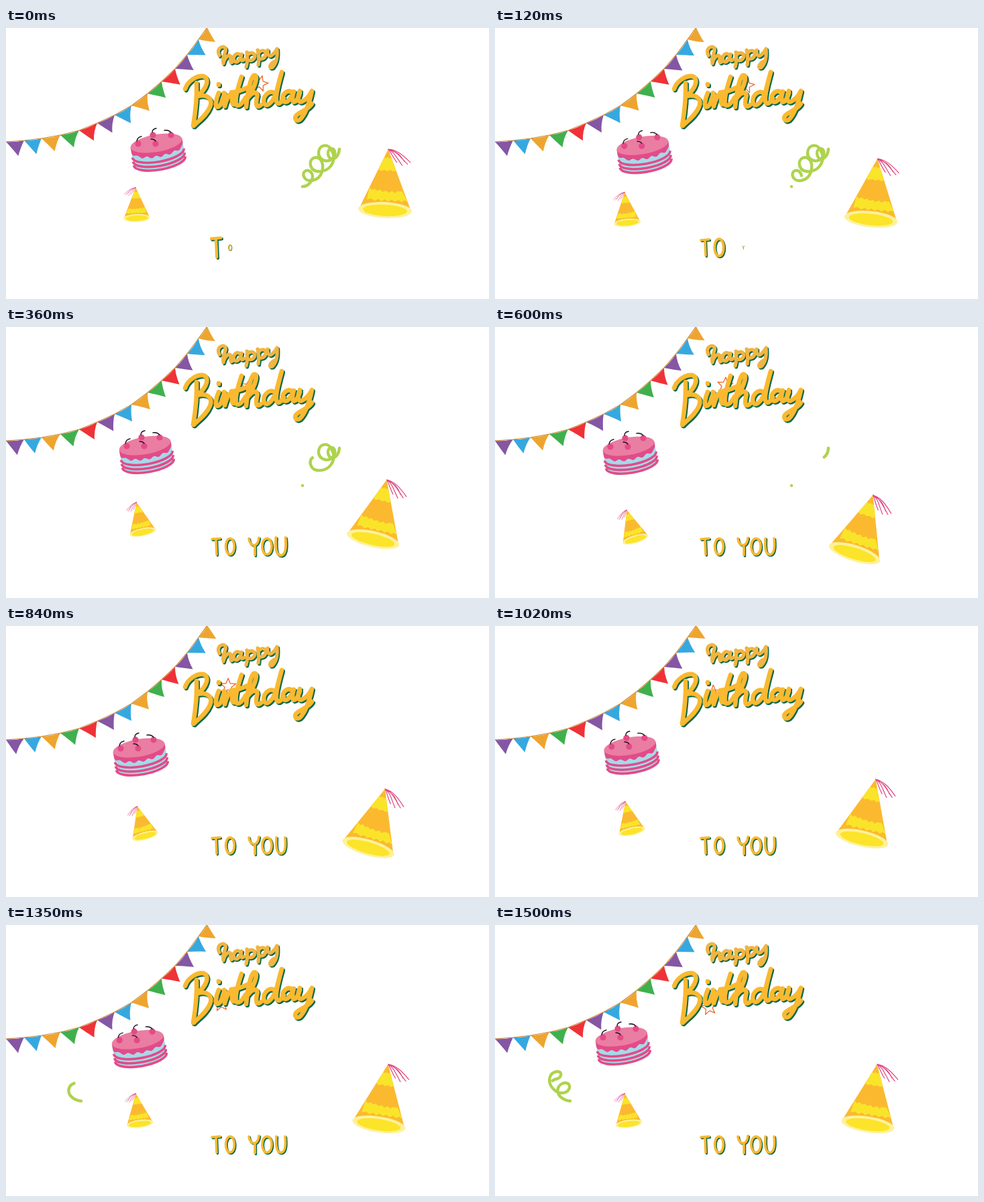
These frames come from a looping animation (720x405 px, 1.53 s). An HTML page:

```html
<!DOCTYPE html>
<html lang="en">
<head>
<meta charset="utf-8">
<title>Happy Birthday</title>
<style>
html, body { margin: 0; width: 100%; height: 100%; overflow: hidden; background: #fff; }
svg { display: block; width: 100vw; height: 100vh; }
.line { fill: none; stroke-linecap: round; stroke-linejoin: round; }
.shade { stroke: #08694c; }
.gold { stroke: #fab930; }
.happy.gold { stroke: #f1b541; }
.happy { stroke-width: 5.2; }
.birth { stroke-width: 6.6; }
.pop { stroke-width: 3.6; }
.curl { stroke: #aed34d; stroke-width: 4.4; }
.tassel { stroke: #df4580; stroke-width: 1.2; }
.stem { stroke: #161616; stroke-width: 1.4; }
.stripe { fill: none; stroke: #e34b87; stroke-width: 3.6; }
</style>
</head>
<body>
<svg viewBox="0 0 720 405" role="img" aria-label="happy Birthday to you">
  <defs>
    <path id="happy" d="M318 41C313 31 322 26 326 29C331 33 321 43 324 53C326 43 334 37 335 44C334 51 335 54 339 49
      M349 40C343 34 336 45 341 50C345 53 350 46 351 39C349 47 351 51 355 47
      M359 36C360 44 360 52 358 58M359 42C364 33 374 38 370 45C367 50 362 49 360 47
      M375 33C377 41 377 49 376 55M376 39C380 30 390 34 387 41C384 47 379 47 377 45
      M390 33C389 40 393 44 397 40C401 37 403 33 404 31C405 42 403 53 397 59C391 61 393 54 400 50"/>
    <path id="birth" d="M267 91C271 79 284 71 294 72C304 75 300 90 285 102C300 98 309 106 304 118C299 130 289 137 280 146
      M284 82C285 105 282 128 279 146
      M317 97C313 106 311 118 315 118C320 118 323 108 326 99M317 84L317 85
      M325 97C329 103 328 110 326 117C329 106 333 98 338 97C338 106 334 116 342 114
      M351 73C346 88 341 106 343 114C346 119 352 113 357 104M336 96C344 96 352 93 360 89
      M358 118C360 98 364 76 369 71C376 68 374 84 360 105C368 94 377 94 374 104C372 114 373 121 380 115
      M401 98C392 90 381 104 385 113C390 120 399 108 403 96C406 84 409 72 411 66C406 84 400 106 404 112C407 115 411 110 414 105
      M427 97C420 89 409 101 413 109C418 115 426 104 429 95C426 104 426 113 431 110C434 108 436 104 438 97
      M438 94C434 104 435 112 441 110C448 107 453 100 456 94C453 108 447 128 438 137C431 141 428 133 436 128C444 123 452 120 456 113"/>
    <g id="hat">
      <path fill="#fbb930" d="M0-91L39 0H-39Z"/>
      <path fill="#fae42a" d="M-5-79l2 2 3-2 3 2 2-2L13-60l-4 2-4-2-5 2-4-2-5 2-4-2Z
        M-25-32l4 3 4-2 4 3 4-2 4 3 5-2 4 3 5-3 4 3 4-3 7 0L33-14l-5-2-4 3-5-3-5 3-5-3-5 3-5-3-5 3-5-3-5 3-6-3-6 2Z"/>
      <ellipse rx="40" ry="12" fill="#fff19a"/>
      <ellipse rx="33" ry="8.5" cy=".5" fill="#fbe429"/>
      <path class="line tassel" d="M0-91C12-91 22-84 34-73M0-91C13-89 20-79 30-70M0-91C9-88 14-78 22-68M0-91C5-86 7-80 14-72M0-91C14-87 18-84 25-74"/>
    </g>
  </defs>
  <g id="flags"></g>
  <path id="star" class="line" stroke="#f0682f" stroke-width="1.3"/>
  <g class="line">
    <use href="#happy" class="happy shade" x="1.6" y="1.8"/>
    <use href="#happy" class="happy gold"/>
    <use href="#birth" class="birth shade" x="1.8" y="2"/>
    <use href="#birth" class="birth gold"/>
  </g>
  <g id="letters" class="line pop"></g>
  <path id="curlA" class="line curl" pathLength="100" d="M442 237C452 237 461 224 455 216C449 209 441 215 444 222C448 232 466 230 471 215C475 201 468 191 459 194C450 198 453 212 463 214C482 217 495 198 485 182C480 172 466 174 466 187C466 200 486 204 490 189C492 177 479 178 480 188C482 202 496 196 497 181"/>
  <path id="curlB" class="line curl" pathLength="100" d="M112 263C101 262 91 254 94 244C97 234 113 233 111 243C109 252 96 254 88 246C77 236 80 221 92 219C101 218 100 228 92 230C86 231 84 235 81 236"/>
  <g id="cake">
    <g transform="translate(226 183) rotate(-10)">
      <path fill="#a5d9ea" d="M-39-11V17A39 13 0 0 0 39 17V-11Z"/>
      <path class="stripe" d="M-39 4A39 13 0 0 0 39 4M-39 10.3A39 13 0 0 0 39 10.3M-39 16A39 13 0 0 0 39 16"/>
      <path id="icing" fill="#e34b87"/>
      <ellipse cy="-11" rx="39" ry="13" fill="#ea7da2"/>
    </g>
    <g fill="#e34b87">
      <circle cx="197" cy="173" r="4.6"/><circle cx="219" cy="160" r="4.6"/>
      <circle cx="246" cy="160" r="4.6"/><circle cx="223" cy="173" r="4.6"/>
    </g>
    <path class="line stem" d="M195 169Q196 163 202 162M218 156Q218 151 224 150M246 156Q242 152 236 153M223 169Q221 166 216 166"/>
  </g>
  <use id="bigHat" href="#hat"/>
  <use id="smallHat" href="#hat"/>
</svg>
<script>
const LOOP = 1530, STEP = 30;
const $ = id => document.getElementById(id);
const make = (tag, attrs, parent) => {
  const el = document.createElementNS('http://www.w3.org/2000/svg', tag);
  for (const k in attrs) el.setAttribute(k, attrs[k]);
  return parent.appendChild(el);
};
const move = (el, value) => el.setAttribute('transform', value);

// keys: [time, value...]; smooth adds Hermite tangents between keys
function track(keys, t, smooth) {
  const last = keys.length - 1;
  if (t <= keys[0][0]) return keys[0].slice(1);
  if (t >= keys[last][0]) return keys[last].slice(1);
  let i = 0;
  while (t >= keys[i + 1][0]) i++;
  const a = keys[i], b = keys[i + 1], dt = b[0] - a[0], u = (t - a[0]) / dt;
  const slope = (n, c) => {
    const p = keys[Math.max(n - 1, 0)], q = keys[Math.min(n + 1, last)];
    return (q[c] - p[c]) / (q[0] - p[0]) * dt;
  };
  return a.slice(1).map((v, k) => {
    const c = k + 1, d = b[c] - v;
    if (!smooth) return v + d * u;
    const m = slope(i, c), n = slope(i + 1, c);
    return v + u * (m + u * (3 * d - 2 * m - n + u * (m + n - 2 * d)));
  });
}

// Bunting
const nodes = [[0, 170], [27, 168], [53, 165], [81, 160], [109, 153], [136, 142], [162, 130],
  [187, 116], [211, 98], [232, 80], [252, 61], [270, 40], [287, 17], [300, -1]];
const hues = ['#8456a4', '#36a8e0', '#eea52f', '#3fb04d', '#ef3237'];
const flags = nodes.slice(1).map((_, i) => make('path', { fill: hues[i % 5] }, $('flags')));
make('path', { d: 'M' + nodes.join('L'), class: 'line', stroke: '#cf8a3c', 'stroke-width': 1.2 }, $('flags'));

function drawFlags(t) {
  flags.forEach((flag, i) => {
    const [ax, ay] = nodes[i], [bx, by] = nodes[i + 1];
    const dx = bx - ax, dy = by - ay, len = Math.hypot(dx, dy), ux = dx / len, uy = dy / len;
    const s = 1.6 * Math.cos(t * 2 * Math.PI / 1500 + i * .7);
    const mx = (ax + bx) / 2, my = (ay + by) / 2;
    const at = (x, y) => `${mx + ux * x - uy * y} ${my + uy * x + ux * y}`;
    flag.setAttribute('d', `M${ax} ${ay}Q${at(s, 2)} ${bx} ${by}Q${at(6.5 + s, 9)} ${at(1.5 + s, 22.5)}Q${at(s - 5, 13)} ${ax} ${ay}Z`);
  });
}

// Star outline
$('star').setAttribute('d', 'M' + Array.from({ length: 10 }, (_, i) => {
  const r = i % 2 ? 5.2 : 12, a = i * Math.PI / 5;
  return [r * Math.sin(a), -r * Math.cos(a)];
}).join('L') + 'Z');
const starPath = [[0, 379, 83], [240, 370, 88], [360, 361, 90], [600, 343, 87], [840, 331, 90], [1200, 322, 111], [1500, 319, 123]];

// Icing with a wavy hem
let hem = 'M-39-11';
for (let x = -39; x <= 39; x++)
  hem += `L${x} ${-4 + 13 * Math.sqrt(1 - (x / 39) ** 2) + 1.5 * Math.sin(x * .45)}`;
$('icing').setAttribute('d', hem + 'L39-11Z');
const cakePath = [[0, 0, 0], [240, -9, 6], [360, -17, 5], [600, -25, 6], [840, -26, 10], [1200, -22, 3], [1500, -36, -5]];

// Letters that pop in one after another: [slot, centre x, outline]
const letters = [
  [0, 313, 'M-6-11L6-12M0-11L1 12'],
  [1, 334, 'M0-12C-9-11-8 12 0 12C9 11 8-12 0-12Z'],
  [3, 370, 'M-8-12C-7 1 6 2 7-13M1-2L1 13'],
  [4, 389, 'M0-12C-10-11-9 12 0 12C10 11 9-12 0-12Z'],
  [5, 410, 'M-7-12C-8 5-6 13 1 12C7 10 7-2 6-12']
].map(([slot, x, d]) => {
  const g = make('g', {}, $('letters'));
  make('path', { d, class: 'shade', transform: 'translate(1.4 1.4)' }, g);
  make('path', { d, class: 'gold' }, g);
  return { slot, x, g };
});
const pop = [[0, 0], [20, .35], [65, 1.1], [85, 1.2], [120, 1.1], [180, 1]];

// Hats sink and tilt together
const hatDrop = [[0, 0], [240, 28], [360, 45], [540, 63.5], [600, 66], [660, 66.6], [840, 59], [1110, 38], [1200, 28], [1350, 26], [1500, 26]];
const trimA = [[0, 0], [240, 16], [360, 38], [600, 95], [630, 100]];
const trimB = [[1290, 0], [1500, 96], [1530, 100]];

function trim(el, from, to) {
  el.style.display = to - from > .5 ? '' : 'none';
  el.setAttribute('stroke-dasharray', `0 ${from} ${to - from} 200`);
}

function draw(t) {
  drawFlags(t);
  const [sx, sy] = track(starPath, t, true);
  move($('star'), `translate(${sx} ${sy}) rotate(${15 - t / 60})`);
  move($('cake'), `translate(${track(cakePath, t, true)})`);
  for (const { slot, x, g } of letters)
    move(g, `translate(${x} 328) scale(${track(pop, t + 85 - slot * 65)})`);
  const [d] = track(hatDrop, t, true);
  const dx = d * .3 + d * d * .0021, turn = 3 + d * .22;
  move($('bigHat'), `translate(${565 - dx} ${272 + d}) rotate(${turn})`);
  move($('smallHat'), `translate(${195 + dx / 2} ${284 + d / 2}) scale(-.5 .5) rotate(${turn - 1})`);
  trim($('curlA'), track(trimA, t)[0], 100);
  trim($('curlB'), 0, track(trimB, t)[0]);
}

function tick() {
  const t = performance.now() % LOOP;
  draw(Math.floor(t / STEP) * STEP);
  requestAnimationFrame(tick);
}
tick();
</script>
</body>
</html>
```
